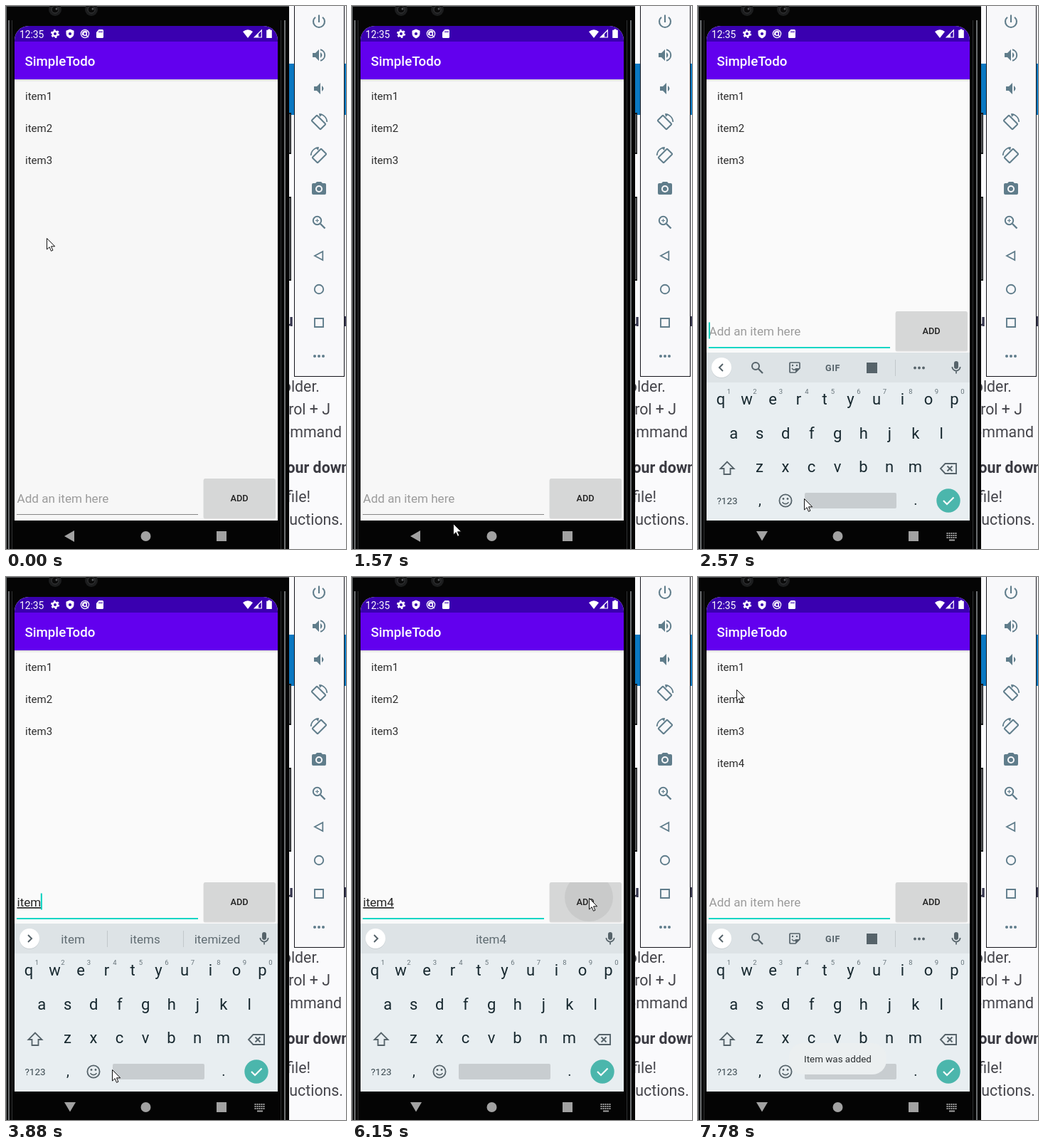
Animation, 478 px wide and 763 px high, one loop 8 s. Source, as an HTML page:

```html
<!DOCTYPE html>
<html lang="en">
<head>
<meta charset="utf-8">
<title>Todo list demo</title>
<style>
html, body { margin: 0; width: 100%; height: 100%; overflow: hidden; background: #fff; }
svg { display: block; width: 478px; height: 763px; }
text { font-family: Roboto, sans-serif; white-space: pre; }
.mid { text-anchor: middle; }
.end { text-anchor: end; }
.line { fill: none; stroke-width: 2; }
</style>
</head>
<body>
<svg id="stage" viewBox="0 0 478 763" xmlns="http://www.w3.org/2000/svg"></svg>
<script>
const LOOP = 8000;
const stage = document.getElementById('stage');

const rect = (x, y, w, h, fill, more = '') =>
  `<rect x="${x}" y="${y}" width="${w}" height="${h}" fill="${fill}" ${more}/>`;
const circle = (x, y, r, fill, more = '') =>
  `<circle cx="${x}" cy="${y}" r="${r}" fill="${fill}" ${more}/>`;
const path = (d, fill, more = '') => `<path d="${d}" fill="${fill}" ${more}/>`;
const text = (s, x, y, size, fill, more = '') =>
  `<text x="${x}" y="${y}" font-size="${size}" fill="${fill}" ${more}>${s}</text>`;
const group = (id, body, more = '') => `<g id="${id}" ${more}>${body}</g>`;
// Icon drawn around its own centre
const icon = (x, y, body, color, more = '') =>
  `<g transform="translate(${x} ${y})" fill="${color}" stroke="${color}" stroke-width="0" ${more}>${body}</g>`;
const line = (d, w = 2) => `<path class="line" d="${d}" style="stroke-width:${w}"/>`;
const ring = (r, w = 2, x = 0, y = 0) =>
  `<circle class="line" cx="${x}" cy="${y}" r="${r}" style="stroke-width:${w}"/>`;
const shape = d => `<path d="${d}"/>`;
const dots = (gap, r) => [-gap, 0, gap].map(x => `<circle cx="${x}" r="${r}"/>`).join('');

function page() {
  const ink = '#45454b';
  return rect(0, 0, 478, 763, '#fafafc') +
    rect(390, 81, 88, 72, '#0a78c2') +
    text('u', 391, 450, 23, '#34344c', 'font-weight="700"') +
    rect(476, 436, 2, 14, '#34344c') +
    [['older.', 441, 542], ['rol + J', 456, 574], ['ommand', 472, 606],
     ['file!', 428, 697], ['uctions.', 474, 729]]
      .map(([s, x, y]) => text(s, x, y, 21.33, ink, 'class="end"')).join('') +
    text('our down', 394.5, 656, 21.33, '#3a3a42', 'font-weight="700"');
}

function panel() {
  const c = '#607d8b';
  const speaker = shape('M-9 -3h4l5-5v16l-5-5h-4z');
  const turn = '<rect class="line" x="-5.3" y="-8.8" width="10.6" height="17.6" rx="1" transform="translate(-.5 .5) rotate(-45)"/>' +
    line('M1 -11A11 11 0 0 1 11.3 0', 1.6) + shape('M0 -12l5 1-4 4z');
  const icons = [
    line('M-5 -6.3A8 8 0 1 0 5 -6.3M0 -9.5V1', 2.1),
    speaker + shape('M2 -4q5 4 0 8z') + line('M2 -7.8A8 8 0 0 1 2 7.8'),
    `<g transform="translate(2 0)">${speaker}${shape('M2 -4q5 4 0 8z')}</g>`,
    turn,
    `<g transform="scale(-1 1)">${turn}</g>`,
    shape('M-3 -10h6l2 2h3q2 0 2 2v12q0 2-2 2h-16q-2 0-2-2v-12q0-2 2-2h3z') +
      `<circle r="4" style="fill:none;stroke:#f8f8fa;stroke-width:2"/>`,
    ring(5.7, 2, -2.5, -2.5) + line('M2 2L8.5 8.5', 2.4) + line('M-5 -2.5h5M-2.5 -5v5', 1.1),
    line('M5.3 -6V6L-6 0z', 1.8),
    ring(6.2, 1.9),
    line('M-6 -6h12v12h-12z', 1.9),
    dots(6, 2)
  ];
  return rect(405.5, -2, 70, 522.5, '#f8f8fa', 'stroke="#15151c"') +
    icons.map((b, i) => icon(440, 22 + 47 * i, b, c)).join('');
}

function phone() {
  const side = (y, h) => rect(396, y, 5, h, '#17191a') + rect(398, y + 2, 2, h - 4, '#55585a');
  const edge = '#6c6f71';
  return side(150, 58) + side(268, 118) +
    rect(0, 0, 398, 763, '#050505') +
    rect(0, 0, 1, 763, edge) + rect(3, 20, 2, 743, edge) + rect(8, 20, 1, 743, '#2f3132') +
    rect(386, 20, 1, 743, '#2f3132') + rect(391, 20, 2, 743, edge) +
    rect(0, 0, 398, 1, '#55585a') +
    [69, 120].map(x => circle(x, 5, 9, '#1c1d1e') + circle(x, 5, 5, '#0a0a0a', 'stroke="#3a3b3d"') +
      circle(x + 2, 4, 1.5, '#55575a')).join('');
}

function bars() {
  const w = '#fff';
  const blue = '#3a00b0';
  return rect(12, 28, 370, 23, blue) + rect(12, 50, 370, 53, '#6200ee') +
    rect(12, 103, 370, 1, '#000', 'opacity=".16"') + rect(12, 104, 370, 2, '#000', 'opacity=".05"') +
    text('12:35', 19, 44.5, 13.8, w) +
    icon(69, 39, ring(3.3, 2.6) + '<circle class="line" r="5.2" stroke-dasharray="2.7 2.75" style="stroke-width:1.8"/>', w) +
    icon(90, 39, shape('M0 -6.5l5.5 2.3v4q0 4.7-5.5 6.7q-5.5-2-5.5-6.7v-4z') +
      circle(0, 0, 2.1, blue), w) +
    icon(111, 39, ring(5.6, 1.3) + ring(2.4, 1.5) + line('M2 2l2.6 3M-3.4 2v-3a3.6 3.6 0 0 1 6.6-1', 1.2), w) +
    icon(132, 39, shape('M-1.5 -6h5q1.5 0 1.5 1.5v9q0 1.5-1.5 1.5h-7q-1.5 0-1.5-1.5v-6.5z') +
      path('M-1 -4v2.5M1 -4v2.5M3 -4v2.5', 'none', `stroke="${blue}" stroke-width="1"`), w) +
    icon(340, 39, shape('M0 6L-7 -3Q0 -8.5 7 -3z'), w) +
    icon(354, 39, line('M5.3 -5v10h-10z', 1.2) + shape('M1 -1v6h-6z'), w) +
    icon(370, 39, shape('M-1.5 -6.5h3v1.3h2.3v11.2h-7.6v-11.2h2.3z'), w) +
    text('SimpleTodo', 26.5, 84, 18.7, w, 'font-weight="500"');
}

function dock() {
  return group('dock',
    group('hint', text('Add an item here', 15.5, 698, 17.1, '#9b9b9b')) +
    text('', 15.5, 698, 17.1, '#262626', 'id="entry" text-decoration="underline"') +
    rect(15, 714, 255, 1, '#858585', 'id="rule"') +
    rect(15, 679.5, 2, 23, '#00d0bd', 'id="caret"') +
    rect(277.5, 664.5, 101.5, 56, '#000', 'rx="2.5" opacity=".12"') +
    rect(278, 664, 100.5, 55, '#d6d7d7', 'rx="2"') +
    circle(333, 685, 34, '#000', 'id="ripple" clip-path="url(#button)"') +
    text('ADD', 328, 695.7, 12.8, '#222', 'class="mid" font-weight="500"'));
}

function keyboard() {
  const c = '#56636a';
  const ink = '#17282f';
  const row = (keys, x, y) => [...keys].map((k, i) =>
    text(k, x + 36.5 * i, y, 22, ink, 'class="mid"')).join('');
  const bar = x => rect(x, 497, 1, 23, '#c2c8cb');
  const tools = group('tools',
    icon(33, 508, line('M2 -5l-5 5 5 5'), c) +
    icon(83, 508, ring(5, 2, -2, -2) + line('M2 2l6 6', 2.3), c) +
    icon(136, 508, line('M-6 -7H6q1 0 1 1V1L1 7H-6q-1 0-1-1V-6q0-1 1-1z', 1.7) + shape('M1 7v-6h6z') +
      line('M-4 1q3 4 5 1', 1.4) + circle(-3, -3, 1.2, c) + circle(3, -3, 1.2, c), c) +
    text('GIF', 189.5, 512.5, 12.6, c, 'class="mid" font-weight="700" letter-spacing=".6"') +
    rect(237, 501, 15, 15, c) +
    bar(277) +
    icon(311, 508.5, dots(6, 1.9), c));
  const suggest = group('suggest',
    icon(33, 508, line('M-2 -5l5 5-5 5'), c) +
    group('splits', bar(142) + bar(249)) +
    [94, 195.5, 297].map((x, i) => text('', x, 515, 17, '#606c72', `id="word${i}" class="mid"`)).join(''));
  return group('keys',
    rect(12, 487, 370, 236, '#e8eef1') + rect(12, 487, 370, 42, '#dde3e6') +
    circle(33, 509, 14, '#b9c0c3', 'opacity=".5"') + circle(33, 508, 14, '#fff') +
    tools + suggest +
    icon(363, 508, '<rect x="-3" y="-9" width="6" height="11" rx="3"/>' +
      line('M-5.6 -1a5.6 5.6 0 0 0 11.2 0M0 4.6V8.5', 1.7), c) +
    row('qwertyuiop', 32, 560) +
    [...'1234567890'].map((n, i) => text(n, 43.5 + 36.5 * i, 545, 9.5, '#68757b', 'class="mid"')).join('') +
    row('asdfghjkl', 50.3, 608) + row('zxcvbnm', 86.5, 655) +
    icon(41, 650, line('M0 -9.5L-9.5 0h5v8h9v-8h5z', 1.8), c) +
    icon(352, 650, line('M-4.5 -7H11V7H-4.5L-11 0z', 1.9) + line('M-1.5 -3.5l7 7m0-7l-7 7', 1.9), c) +
    text('?123', 41, 700, 13.5, '#38474e', 'class="mid"') +
    text(',', 87, 701, 20, ink, 'class="mid"') + text('.', 306, 701, 20, ink, 'class="mid"') +
    icon(123, 695, ring(8.6, 1.8) + line('M-4.5 2.2q4.5 5 9 0', 1.7) + circle(-3, -2.5, 1.4, c) + circle(3, -2.5, 1.4, c), c) +
    rect(150, 684, 129, 22, '#c8cdd0', 'rx="2"') +
    circle(352, 695, 16.7, '#4bb6ac') +
    icon(352, 695, line('M-7 0l5 5 9.5-9.5', 2.2), '#fff'));
}

function nav() {
  const c = '#a2a2a2';
  return rect(12, 723, 370, 40, '#040404') +
    path('M82 745L96 737V753z', c, 'id="back"') +
    path('M82 738H98L90 751.5z', c, 'id="down"') +
    circle(196.5, 745, 7, c) + rect(296, 738, 14, 14, c) +
    group('board', [0, 1, 2].map(r => [0, 1, 2, 3, 4].map(k =>
      rect(349.5 + 3 * k, 740 + 3 * r, 2, 2, c)).join('')).join('') + rect(353, 749.5, 8, 2, c));
}

stage.innerHTML =
  '<defs><clipPath id="screen"><path d="M12 723V48A20 20 0 0 1 32 28H362A20 20 0 0 1 382 48V723z"/></clipPath>' +
  '<clipPath id="button"><rect x="278" y="664" width="100.5" height="55" rx="2"/></clipPath></defs>' +
  page() + phone() + panel() +
  `<g clip-path="url(#screen)">${rect(12, 28, 370, 695, '#f7f7f7', 'id="paper"')}` +
  [1, 2, 3, 4].map(n => text('item' + n, 27, 87 + 45 * n, 15, '#2c2c2c', `id="item${n}"`)).join('') +
  bars() + dock() + keyboard() +
  group('toast', rect(128, 655, 137, 44, '#ebeff0', 'rx="20"') +
    text('Item was added', 196.5, 682, 13.4, '#2b2f31', 'class="mid"')) +
  '</g>' + nav() +
  path('M0 0V15.5L3.6 12.2L6 17.8L8.4 16.7L6 11.3H11.2z', '#fff', 'id="mouse" stroke="#111" stroke-width="1"');

const el = {};
stage.querySelectorAll('[id]').forEach(e => el[e.id] = e);

// Step tables: [start time, value...]
const mouse = [
  [0, 57, 326], [120, 47, 322], [240, 29, 300], [360, 27, 255], [480, 54, 170], [600, 79, 147],
  [720, 86, 151], [870, 120, 205], [990, 168, 340], [1140, 185, 504],
  [1300, 182, 590], [1420, 165, 680], [1570, 142, 727], [1720, 134, 726], [1870, 143, 706], [2020, 149, 692],
  [5270, 155, 680], [5420, 177, 600], [5570, 206, 500], [5720, 237, 432], [5870, 300, 414], [6020, 326, 428],
  [6150, 333, 451], [6570, 324, 428], [6710, 290, 360], [6850, 235, 285], [7000, 180, 222],
  [7150, 122, 176], [7270, 82, 153], [7420, 60, 149], [7540, 56, 151], [7660, 54, 155], [7780, 54, 158]
];
const typing = [
  [0, ''], [3520, 'i', 'I', 'in', 'is'], [3640, 'it', 'it', 'its', 'items'],
  [3760, 'ite', 'item', 'items', 'itemized'], [3880, 'item', 'item', 'items', 'itemized'],
  [4720, 'item4', '', 'item4', ''], [6270, '']
];
const blink = [
  [0, 0], [2300, 1], [2720, 0], [3250, 1], [4440, 0], [4720, 1], [5270, 0],
  [5720, 1], [6150, 0], [6270, 1], [6850, 0], [7270, 1], [7780, 0]
];
const slide = [[0, 236], [2450, 120], [2570, 0]];
const ripple = [[0, 0, 0], [6150, 34, .06], [6270, 75, .05], [6430, 0, 0]];
const added = [[0, 0], [6430, .4], [6570, 1]];

const at = (table, t) => table.findLast(row => row[0] <= t).slice(1);
const show = (e, on) => e.setAttribute('visibility', on ? 'visible' : 'hidden');
const set = (e, attrs) => { for (const k in attrs) e.setAttribute(k, attrs[k]); };

function draw(t) {
  const focus = t >= 2300, open = t >= 2450;
  const [x, y] = at(mouse, t);
  set(el.mouse, { transform: `translate(${x + .5} ${y + .5})` });

  const [typed, ...words] = at(typing, t);
  el.entry.textContent = typed;
  show(el.hint, !typed);
  show(el.tools, !typed);
  show(el.suggest, typed);
  show(el.splits, typed && typed !== 'item4');
  for (let i = 0; i < 3; i++) el['word' + i].textContent = words[i] || '';

  show(el.caret, at(blink, t)[0]);
  set(el.caret, { x: typed ? 15 + el.entry.getComputedTextLength() : 15 });
  set(el.rule, focus ? { height: 2, fill: '#12d6c5' } : { height: 1, fill: '#858585' });

  set(el.paper, { fill: open ? '#fafafa' : '#f7f7f7' });
  set(el.dock, { transform: `translate(0 ${open ? -235 : 0})` });
  set(el.keys, { transform: `translate(0 ${at(slide, t)[0]})` });
  show(el.back, !open);
  show(el.down, open);
  show(el.board, open);

  const [r, alpha] = at(ripple, t);
  set(el.ripple, { r, opacity: alpha });
  const [fade] = at(added, t);
  set(el.item4, { opacity: fade });
  set(el.toast, { opacity: fade });
}

const start = performance.now();
function tick() {
  draw((performance.now() - start) % LOOP);
  requestAnimationFrame(tick);
}
tick();
</script>
</body>
</html>
```
